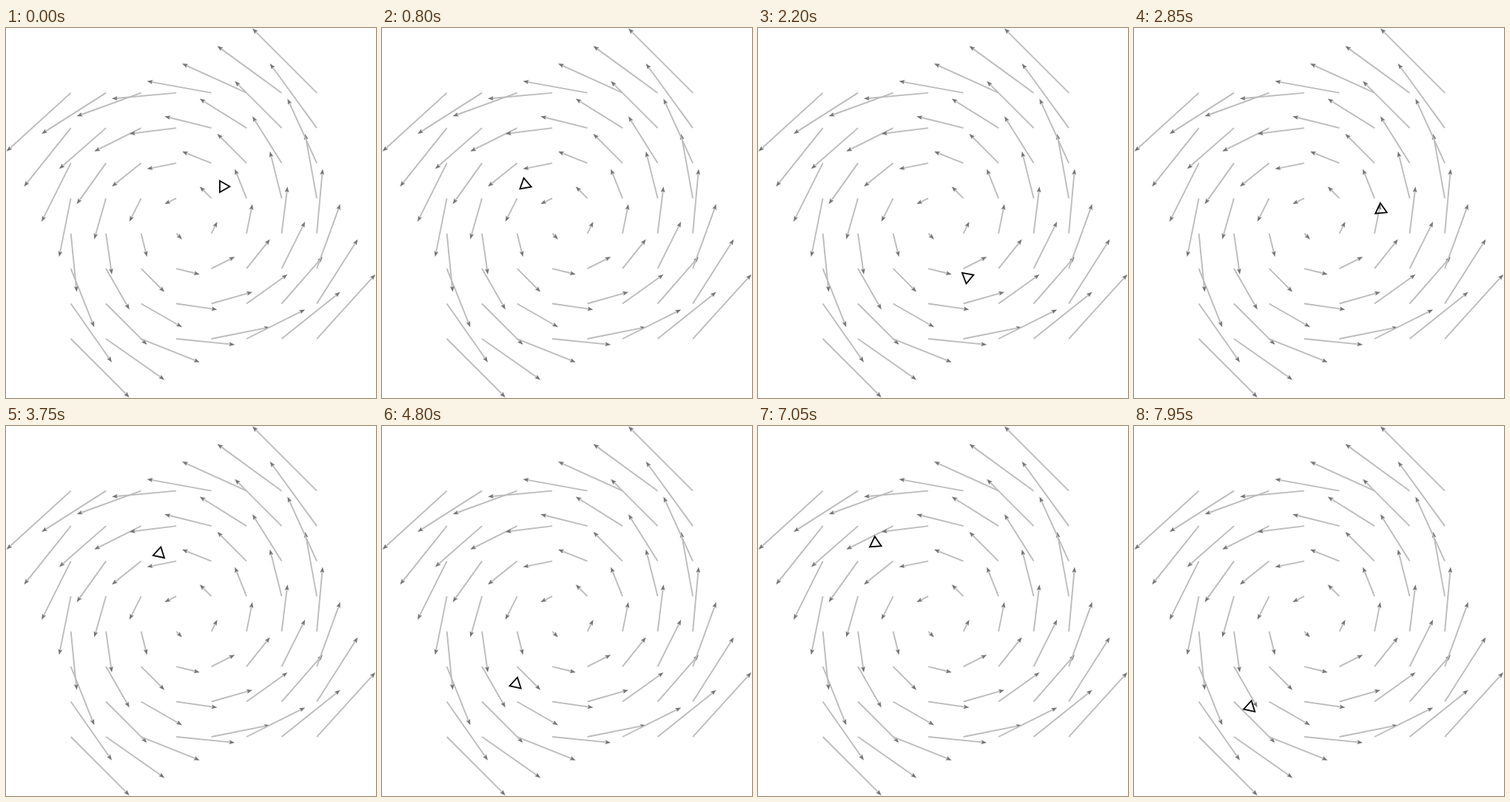
An HTML page for the animation above (8 s loop, 500 px wide and 500 px high).

```html
<!DOCTYPE html>
<html lang="en">
<head>
<meta charset="utf-8">
<title>Rotational vector field</title>
<style>
  html, body { margin: 0; width: 100%; height: 100%; overflow: hidden; background: #fff; }
  svg { display: block; width: 100vw; height: 100vh; }
</style>
</head>
<body>
<svg viewBox="0 0 500 500">
  <g id="field"></g>
  <path id="turtle" fill="none" stroke="#000" stroke-width="1.8" stroke-miterlimit="4"/>
</svg>
<script>
const UNIT = 47.48, CX = 245.9, CY = 261.75;
const STEP_MS = 50, STEPS = 160, H = 0.1;
const R = 9;

const px = x => CX + x * UNIT;
const py = y => CY - y * UNIT;
const velocity = (x, y) => [-y, x];

function add(parent, tag, attrs) {
  const el = document.createElementNS('http://www.w3.org/2000/svg', tag);
  for (const key in attrs) el.setAttribute(key, attrs[key]);
  parent.appendChild(el);
}

function arrow(parent, x, y) {
  const [vx, vy] = velocity(x, y);
  const x2 = px(x + vx / 2), y2 = py(y + vy / 2);
  const a = Math.atan2(-vy, vx);
  add(parent, 'line', {
    x1: px(x), y1: py(y),
    x2: x2 - 6 * Math.cos(a), y2: y2 - 6 * Math.sin(a),
    stroke: '#bcbcbc', 'stroke-width': 1.9
  });
  add(parent, 'path', {
    d: 'M0 0L-7.8 -2.9L-6.2 0L-7.8 2.9Z',
    fill: '#757575',
    transform: `translate(${x2} ${y2}) rotate(${a * 180 / Math.PI})`
  });
}

const field = document.getElementById('field');
for (let i = 0; i < 8; i++)
  for (let j = 0; j < 8; j++) arrow(field, i - 10 / 3, j - 10 / 3);

// Explicit Euler steps, so the orbit slowly spirals outwards.
const poses = [{ x: 1, y: 1, heading: 0 }];
while (poses.length < STEPS) {
  const { x, y } = poses[poses.length - 1];
  const [vx, vy] = velocity(x, y);
  poses.push({ x: x + H * vx, y: y + H * vy, heading: Math.atan2(vy, vx) });
}

const turtle = document.getElementById('turtle');
function draw(ms) {
  const { x, y, heading } = poses[Math.floor(ms / STEP_MS) % STEPS];
  const corners = [0, 1, 2].map(k => {
    const a = heading + k * Math.PI * 2 / 3;
    return `${px(x) + R * Math.cos(a)} ${py(y) - R * Math.sin(a)}`;
  });
  turtle.setAttribute('d', `M${corners.join('L')}Z`);
}

const start = performance.now();
function tick() {
  draw(performance.now() - start);
  requestAnimationFrame(tick);
}
tick();
</script>
</body>
</html>
```
